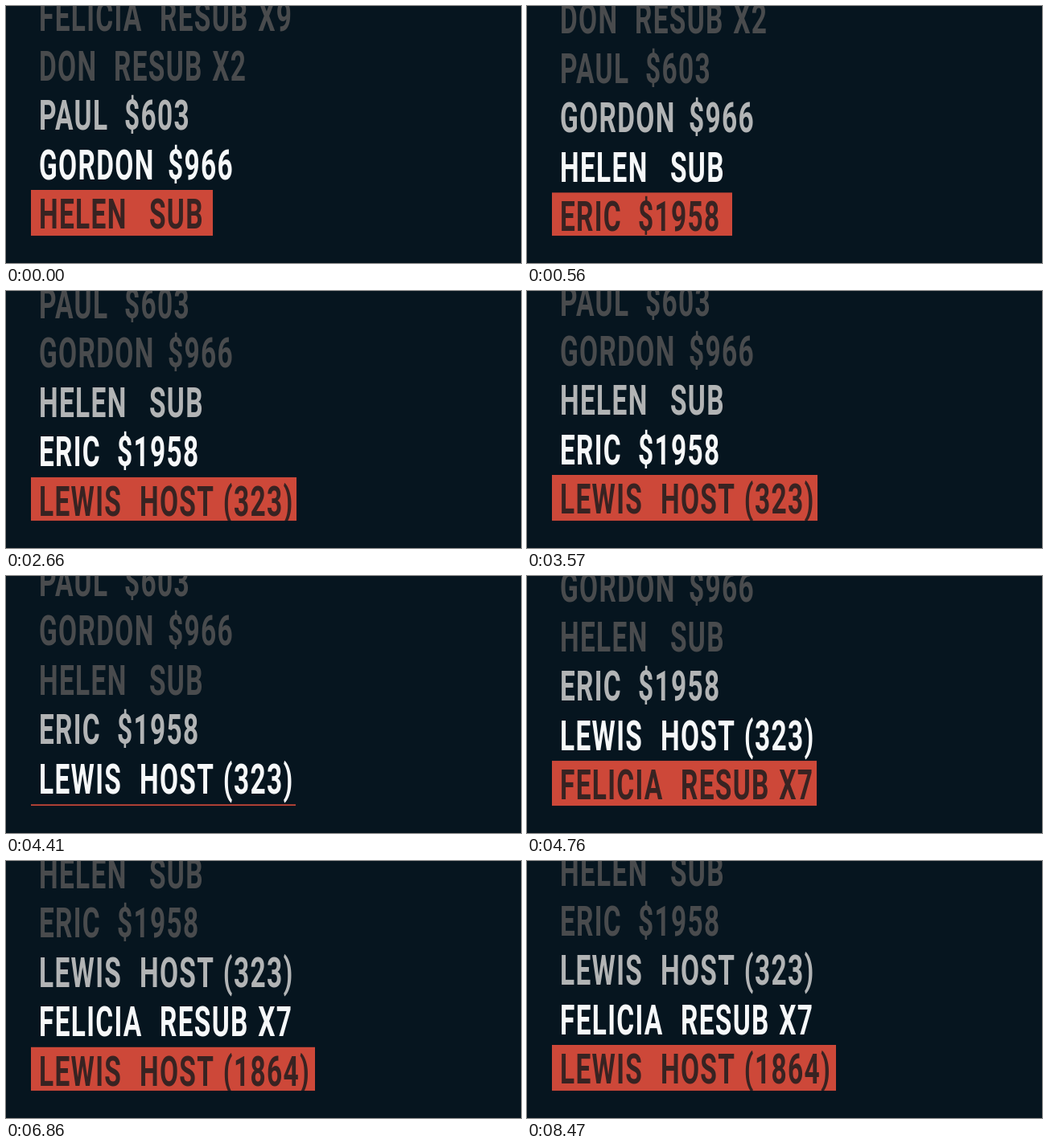
These frames come from a looping animation (640 px wide and 320 px high, 8.54 s). An HTML page:

```html
<!DOCTYPE html>
<html lang="en">
<head>
<meta charset="utf-8">
<style>
  html, body { margin: 0; width: 100%; height: 100%; overflow: hidden; background: #06151f; }
  svg { display: block; }
  text { font: 600 51.5px Roboto, sans-serif; letter-spacing: 2px; word-spacing: 3px; }
</style>
</head>
<body>
<svg width="640" height="320">
  <clipPath id="window"><rect width="640" height="286"/></clipPath>
  <g clip-path="url(#window)"><g id="feed"></g></g>
</svg>
<script>
const LOOP = 8540, PITCH = 61.5, SLIDE = 780, LEFT = 31, CONDENSE = 0.65;
const ARRIVALS = [5, 2098, 4150, 6295];
const FIRST_NEWEST = 4;
const SHADES = ['#f6f8f9', '#b2b4b5', '#494b4d'];

// name, event, x of the event, right edge of the highlight
const EVENTS = [
  ['FELICIA', 'RESUB X9', 192, 364],
  ['DON', 'RESUB X2', 135, 306],
  ['PAUL', '$603', 148, 245],
  ['GORDON', '$966', 202, 299],
  ['HELEN', 'SUB', 179, 257],
  ['ERIC', '$1958', 139, 255],
  ['LEWIS', 'HOST (323)', 167, 361],
  ['FELICIA', 'RESUB X7', 192, 360],
  ['LEWIS', 'HOST (1864)', 167, 384]
];

const feed = document.getElementById('feed');

function add(parent, tag, attrs, content = '') {
  const node = document.createElementNS('http://www.w3.org/2000/svg', tag);
  for (const key in attrs) node.setAttribute(key, attrs[key]);
  node.textContent = content;
  return parent.appendChild(node);
}

function addText(row, x, content) {
  add(row, 'text', { transform: `translate(${x} 277) scale(${CONDENSE} 1)` }, content);
}

const rows = EVENTS.map(([name, event, x, right], i) => {
  const row = add(feed, 'g', { transform: `translate(0 ${(i - FIRST_NEWEST) * PITCH})` });
  const bar = add(row, 'rect', { x: LEFT, y: 229, width: right - LEFT, height: 58, fill: '#cd4839' });
  addText(row, 41, name);
  addText(row, x - 1, event);
  return { row, bar };
});

function easeInOutQuart(p) {
  return p < 0.5 ? 8 * p ** 4 : 1 - 8 * (1 - p) ** 4;
}

function render(time) {
  const t = time % LOOP;
  let newest = FIRST_NEWEST, scroll = 0;
  for (const start of ARRIVALS) {
    if (t < start) break;
    newest++;
    scroll += easeInOutQuart(Math.min(1, (t - start) / SLIDE));
  }
  feed.setAttribute('transform', `translate(0 ${-scroll * PITCH})`);
  rows.forEach(({ row, bar }, i) => {
    const age = newest - i;
    row.setAttribute('visibility', age < 0 ? 'hidden' : 'visible');
    row.setAttribute('fill', age ? SHADES[Math.min(age, 3) - 1] : '#382322');
    bar.setAttribute('opacity', age ? 0 : 1);
  });
}

const begin = performance.now();
(function tick() {
  render(performance.now() - begin);
  requestAnimationFrame(tick);
})();
</script>
</body>
</html>
```
